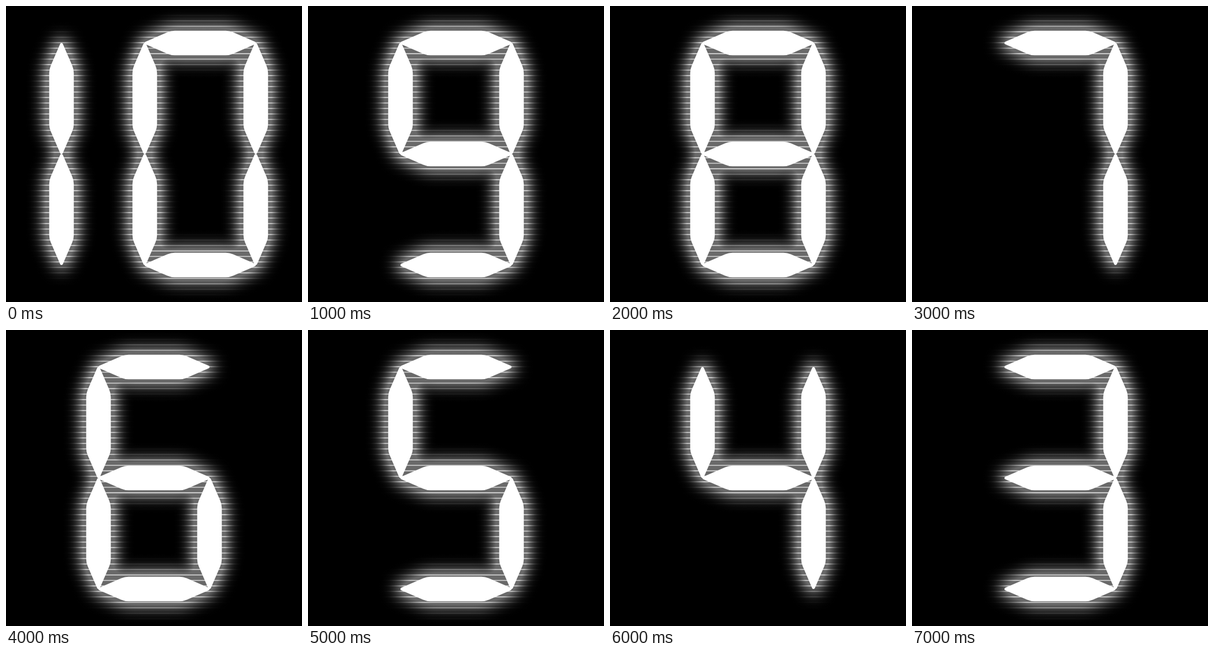
Write an HTML page that moves like this. It is 512 px wide and 512 px high and loops after 8 s.

```html
<!DOCTYPE html>
<html lang="en">
<head>
<meta charset="utf-8">
<title>Countdown</title>
<style>
  html, body { margin: 0; width: 100%; height: 100%; overflow: hidden; background: #000; }
  svg { display: block; width: 100vw; height: 100vh; }
  path { fill: #fff; stroke: #fff; stroke-width: 5; stroke-linejoin: round; }
  #glow { stroke-width: 21; }
</style>
</head>
<body>
<svg viewBox="0 0 512 512">
  <defs>
    <filter id="blur" filterUnits="userSpaceOnUse" x="0" y="0" width="512" height="512" color-interpolation-filters="sRGB">
      <feGaussianBlur stdDeviation="13.5"/>
      <feComponentTransfer><feFuncA type="linear" slope="1.75"/></feComponentTransfer>
    </filter>
    <linearGradient id="scan" gradientUnits="userSpaceOnUse" x1="0" y1="30.3" x2="0" y2="39.78" spreadMethod="repeat">
      <stop offset="0" stop-opacity=".56"/>
      <stop offset=".08" stop-opacity=".6"/>
      <stop offset=".36" stop-opacity=".58"/>
      <stop offset=".45" stop-opacity=".28"/>
      <stop offset=".5" stop-opacity=".06"/>
      <stop offset=".55" stop-opacity=".28"/>
      <stop offset=".64" stop-opacity=".58"/>
      <stop offset=".92" stop-opacity=".6"/>
      <stop offset="1" stop-opacity=".56"/>
    </linearGradient>
  </defs>
  <rect width="512" height="512"/>
  <path id="glow" filter="url(#blur)"/>
  <rect width="512" height="512" fill="url(#scan)"/>
  <path id="digits"/>
</svg>
<script>
const STEP = 1000, SIZE = 192, TOP = 64;
const COUNT = ['10', '9', '8', '7', '6', '5', '4', '3'];
const LIT = ['abcdef', 'bc', 'abdeg', 'abcdg', 'bcfg', 'acdfg', 'acdefg', 'abc', 'abcdefg', 'abcdfg'];

// Segment start in units of SIZE, and whether it stands upright
const SEGMENTS = {
  a: [0, 0, false], b: [1, 0, true], c: [1, 1, true], d: [0, 2, false],
  e: [0, 1, true], f: [0, 0, true], g: [0, 1, false]
};

// Outline inset by half the stroke, so the stroke rounds the tips
const TIP = 2.5, CORNER = 46, HALF = 18.8, ROUND = 6;
const SHOULDER = HALF * (1 - ROUND / (CORNER - TIP));

function segment(left, name) {
  const [col, row, upright] = SEGMENTS[name];
  const x = left + col * SIZE, y = TOP + row * SIZE;

  // One long side from its start to its end; dir -1 runs it backwards
  const side = dir => {
    const p = (along, across) => {
      const a = dir > 0 ? along : SIZE - along, b = -dir * across;
      return upright ? `${x + b} ${y + a} ` : `${x + a} ${y + b} `;
    };
    const far = SIZE - CORNER;
    return `L${p(TIP, 0)}L${p(CORNER - ROUND, SHOULDER)}` +
      `Q${p(CORNER, HALF)}${p(CORNER + ROUND, HALF)}` +
      `L${p(far - ROUND, HALF)}Q${p(far, HALF)}${p(far + ROUND, SHOULDER)}`;
  };
  return `M${side(1).slice(1)}${side(-1)}Z`;
}

function outline(text) {
  const last = text.length > 1 ? 240 : 160;
  return [...text].map((digit, i) => {
    const left = last - (text.length - 1 - i) * 336;
    return [...LIT[digit]].map(name => segment(left, name)).join('');
  }).join('');
}

const shapes = COUNT.map(outline);
const layers = [document.getElementById('glow'), document.getElementById('digits')];
let shown = -1;

function draw(now) {
  const step = Math.floor(now / STEP) % COUNT.length;
  if (step !== shown) {
    layers.forEach(layer => layer.setAttribute('d', shapes[step]));
    shown = step;
  }
}

const start = performance.now();
function tick() {
  draw(performance.now() - start);
  requestAnimationFrame(tick);
}
tick();
</script>
</body>
</html>
```
